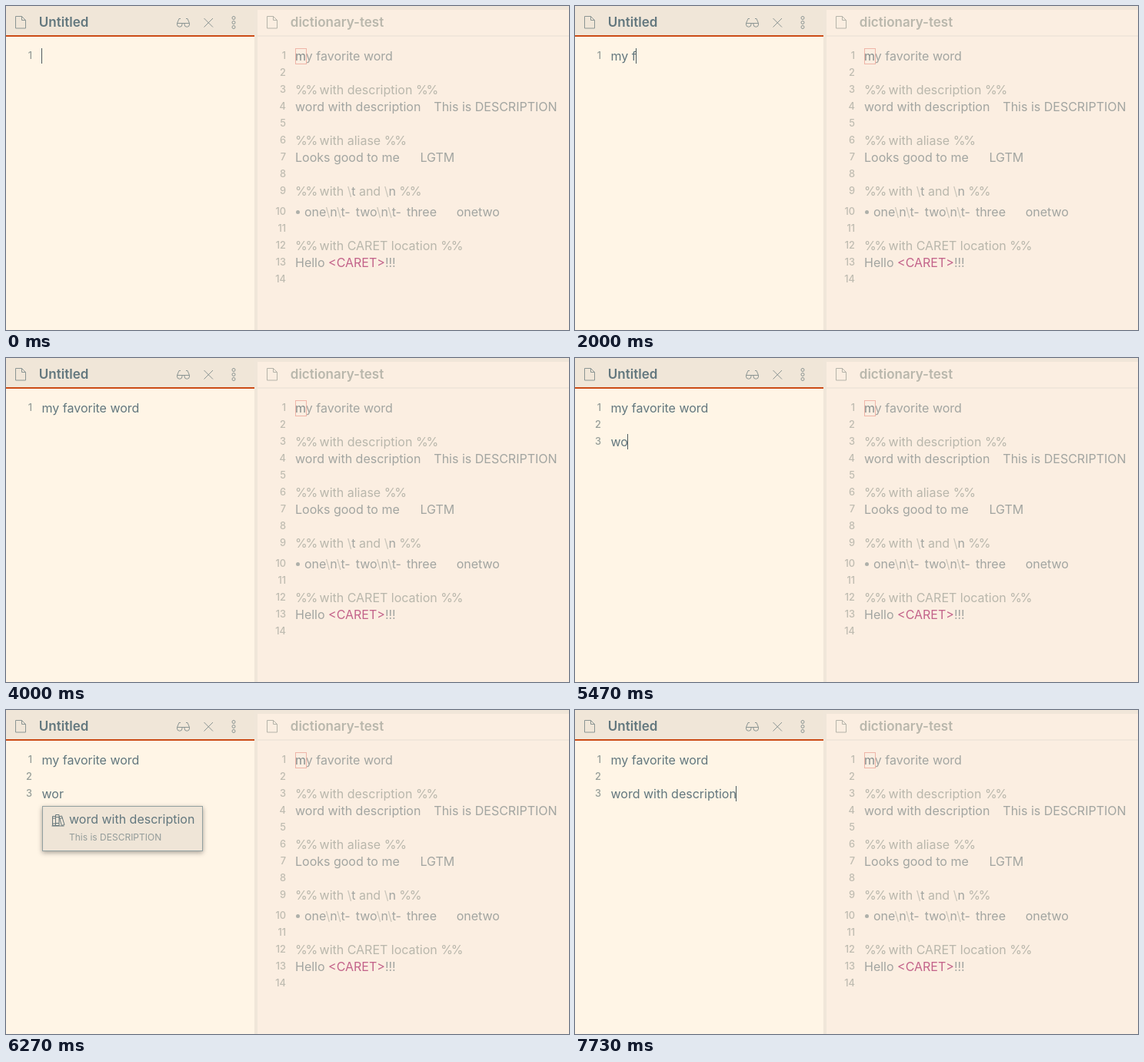
These frames come from a looping animation (732x422 px, 8 s). An HTML page:

```html
<!DOCTYPE html>
<html lang="en">
<head>
<meta charset="utf-8">
<title>Editor completion</title>
<style>
  html, body { margin: 0; width: 100%; height: 100%; overflow: hidden; }
  body {
    position: relative;
    background: #f0e6d9;
    color: #62777e;
    font: 16px/22px Inter, "Liberation Sans", sans-serif;
    white-space: pre;
  }
  .pane, .head, .row, .num, .at, .caret, .popup, svg { position: absolute; }
  .pane { overflow: hidden; }
  #left { left: 0; top: 0; width: 323px; height: 422px; background: #fff5e6; }
  #right { left: 327px; top: 5px; width: 405px; height: 417px; background: #fbeee1; color: #a2a5a1; }
  .head { left: 0; right: 0; top: 0; font-weight: 600; font-size: 17px; }
  #left .head { height: 38px; background: #f0e6d8; border-bottom: 2px solid #cb4b16; }
  #right .head { height: 33px; border-bottom: 2px solid #f1e6da; color: #b9b7ac; }
  .head .at { left: 42.8px; top: 10px; }
  #right .head .at { top: 5px; }
  .row { left: 46.5px; height: 22px; }
  #right .row { left: 49px; }
  .num { right: calc(100% + 12.5px); font-size: 12.8px; font-weight: 500; color: #979e99; }
  #right .num { right: calc(100% + 12px); color: #bfbcb1; }
  .caret { top: 1px; width: 1px; height: 20px; margin-left: -.5px; background: #4f5c60; }
  .dim { color: #b9b7ac; }
  .pct { letter-spacing: -2.2px; }
  .item { left: 12px; word-spacing: 2.5px; }
  .pale { color: #c9c5ba; }
  .tag { color: #c3638a; }
  .block { left: 0; top: 1px; width: 13px; height: 19px; border: 1px solid #efb5a8; }
  .dark { color: #858d8c; }
  .dot { left: 1px; top: 9px; width: 5px; height: 5px; border-radius: 50%; background: #aeb0aa; }
  .popup {
    padding: 5px 10px 6px 34px;
    background: #efe5d7;
    border: 1px solid #93a0a0;
    box-shadow: 0 2px 6px rgba(0, 0, 0, .35);
  }
  .popup small { display: block; margin-top: 2px; font-size: 12px; color: #939c9a; }
  svg { left: 0; top: 0; fill: none; stroke: #8b9593; stroke-width: 1; overflow: visible; }
  #right svg { stroke: #b5b3a9; }
  .popup svg { stroke: #66777b; }
  [hidden] { display: none; }
</style>
</head>
<body>
<div class="pane" id="left">
  <div class="head"><svg width="323" height="38">
    <path d="M12.5 13.5h8l5 5v10.5h-13zM20.5 13.5v5h5"/>
    <path d="M222.5 22.5h6.5v1.5a3.25 3.25 0 0 1-6.5 0zM232 22.5h6.5v1.5a3.25 3.25 0 0 1-6.5 0zM229 22.5h3M222.5 22.5l2.5-6h2M238.5 22.5l-2.5-6h-2"/>
    <path d="M257.5 16l11.5 11.5M269 16l-11.5 11.5"/>
    <circle cx="296" cy="15.5" r="2"/><circle cx="296" cy="21.5" r="2"/><circle cx="296" cy="27.5" r="2"/>
  </svg><span class="at">Untitled</span></div>
  <div id="text"></div>
  <div class="popup" id="first" style="left:74px;top:81px" hidden><svg width="1" height="1"><use href="#books"/></svg>my favorite word</div>
  <div class="popup" id="second" style="left:47px;top:125px" hidden><svg width="1" height="1"><use href="#books"/></svg>word with description<small>This is DESCRIPTION</small></div>
  <svg width="0" height="0"><defs><path id="books" d="M12.5 12.5h4v12h-4zM16.5 10.5h4.5v14h-4.5zM21 13l3.5-1 3.5 11.5-3.5 1zM12.5 15h4M12.5 22h4M16.5 13.5h4.5M16.5 21.5h4.5M22 15.5l3.5-1M11.5 25h16"/></defs></svg>
</div>
<div class="pane" id="right">
  <div class="head"><svg width="405" height="33">
    <path d="M12.5 8.5h8l5 5v10.5h-13zM20.5 8.5v5h5"/>
  </svg><span class="at">dictionary-test</span></div>
</div>
<script>
const $ = id => document.getElementById(id);
const row = (n, top, html) =>
  `<div class="row" style="top:${top}px"><span class="num">${n}</span>${html}</div>`;

// Right pane: static dictionary
const at = (x, s) => `<span class="at" style="left:${x}px">${s}</span>`;
const pct = '<span class="pct">%%</span>';
const note = s => `<span class="dim">${pct} ${s} ${pct}</span>`;
const esc = c => `<span class="pale">\\</span><span style="color:#a2a5a1">${c}</span>`;
const tab = esc("n") + esc("t");
const entries = [
  '<span class="dark">m</span>y favorite word<i class="at block"></i>',
  "",
  note("with description"),
  "word with description" + at(180.3, "This is DESCRIPTION"),
  "",
  note("with aliase"),
  "Looks good to me" + at(162.4, "LGTM"),
  "",
  note(`with ${esc("t")} and ${esc("n")}`),
  `<i class="at dot"></i><span class="at item">one${tab}- two${tab}- three</span>` + at(209.7, "onetwo"),
  "",
  note("with CARET location"),
  'Hello <span class="tag">&lt;CARET&gt;</span>!!!',
  ""
];
$("right").insertAdjacentHTML("beforeend",
  entries.map((s, i) => row(i + 1, 49 + 22 * i + (i > 8 ? 5 : 0), s)).join(""));

// Left pane: typing, caret blink and suggestions
const LOOP = 8000, BLINK = 600;
const done = "my favorite word";
const keys = [
  [-270, ""], [1200, "m"], [1530, "my"], [1730, "my "], [1930, "my f"],
  [2070, "my fa"], [2270, "my fav"], [2930, done],
  [4200, done + "\n"], [4470, done + "\n\n"],
  [5330, done + "\n\nw"], [5470, done + "\n\nwo"], [5670, done + "\n\nwor"],
  [7400, done + "\n\nword with description"]
];
let shown = "";

function draw(now) {
  const t = now % LOOP;
  const [since, text] = keys.filter(k => k[0] <= t).pop();
  const on = (t - since) % (2 * BLINK) < BLINK;
  const state = text + "|" + on;
  if (state !== shown) {
    shown = state;
    const lines = text.split("\n");
    $("text").innerHTML = lines.map((s, i) => row(i + 1, 54 + 22 * i,
      s + (on && i === lines.length - 1 ? '<i class="caret"></i>' : ""))).join("");
  }
  $("first").hidden = t < 2330 || t >= 2930;
  $("second").hidden = t < 5730 || t >= 7400;
}

const start = performance.now();
function tick() {
  draw(performance.now() - start);
  requestAnimationFrame(tick);
}
tick();
</script>
</body>
</html>
```
